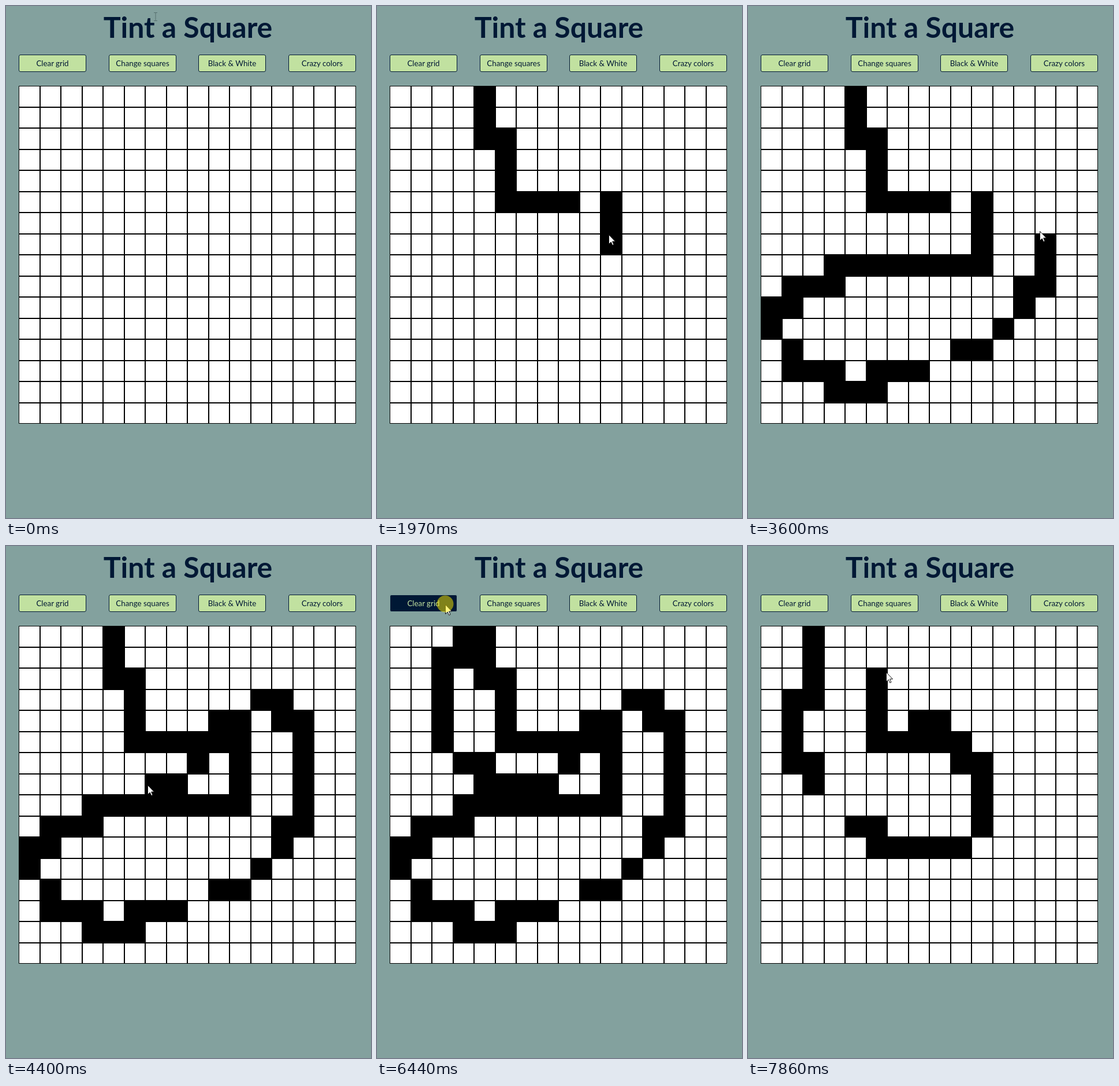
Animation, 632 px wide and 885 px high, one loop 8000 ms. Source, as an HTML page with a canvas:

```html
<!DOCTYPE html>
<html lang="en">
<head>
<meta charset="utf-8">
<title>Tint a Square</title>
<style>
  html, body { margin: 0; width: 100%; height: 100%; overflow: hidden; }
  body { position: relative; background: #83a19e; color: #001835; font-family: Lato, sans-serif; }
  h1 { position: absolute; left: 0; top: 6px; width: 630px; margin: 0; font: 700 50px/60px Lato, sans-serif; text-align: center; }
  button {
    position: absolute; top: 84px; width: 117px; height: 30px; box-sizing: border-box; padding: 0;
    border: 1px solid #001835; border-radius: 3px; background: #c1e1a0; color: inherit;
    font: 400 13.333px Lato, sans-serif;
  }
  button.hover { background: #001835; color: #c1e1a0; border-color: #83a19e; }
  canvas { position: absolute; left: 0; top: 0; pointer-events: none; }
</style>
</head>
<body>
<h1>Tint a Square</h1>
<button style="left:22px">Clear grid</button>
<button style="left:178px">Change squares</button>
<button style="left:333px">Black &amp; White</button>
<button style="left:489px">Crazy colors</button>
<canvas width="632" height="885"></canvas>
<script>
const LOOP = 8000, SIZE = 16;
const ctx = document.querySelector('canvas').getContext('2d');
const clearButton = document.querySelector('button');
const arrow = new Path2D('M.5.5V16.5L4.2 13 6.7 18.5 9 17.5 6.6 12H11.5Z');

// Each step: time, pointer x, pointer y, cells inked (column and row as hex digits), mode
const steps = [
  [0, 259, 18, '', 'text'],
  [200, 240, 32, '', 'text'],
  [390, 212, 62],
  [580, 167, 84],
  [770, 161, 108],
  [950, 170, 130],
  [1140, 187, 171, '40'],
  [1360, 195, 230, '41 42'],
  [1560, 222, 300, '52 53 54'],
  [1770, 330, 340, '55 65 75 85'],
  [1970, 401, 395, 'a5 a6 a7'],
  [2170, 365, 440, 'a8 98'],
  [2380, 250, 445, '88 78 68'],
  [2580, 140, 480, '58 48 38 39'],
  [2780, 40, 560, '29 19 1a 0a 0b'],
  [2980, 132, 641, '1c 1d 2d'],
  [3180, 225, 630, '3d 3e 4e 5e 5d'],
  [3400, 405, 590, '6d 7d 9c ac'],
  [3600, 505, 389, 'bb ca c9 d9 d8 d7'],
  [3800, 505, 300, 'd6 d5 d4'],
  [4000, 440, 268, 'c4 c3 b3'],
  [4200, 330, 345, 'a4 94 95 85'],
  [4400, 245, 413, '86 77 67'],
  [4620, 150, 370, '57 47 46 36'],
  [4820, 112, 260, '25 24 23'],
  [5020, 118, 190, '22 21'],
  [5230, 160, 148, '31 30'],
  [5430, 150, 122],
  [5630, 128, 107, '', 'hover'],
  [5840, 120, 102, '', 'hover'],
  [6040, 118, 101, '', 'hover'],
  [6440, 118, 101, '', 'press'],
  [6640, 118, 101, '', 'clear'],
  [6840, 85, 275, '20 21 22 23 13'],
  [7040, 123, 411, '14 15 16 26 27'],
  [7270, 290, 520, '49 59 5a 6a 7a'],
  [7460, 357, 353, '8a 9a a9 a8 a7 a6 96 95'],
  [7660, 260, 340, '85 84 74 75 65'],
  [7860, 239, 218, '55 54 53 52']
];

const edge = (start, i) => Math.round(start + 36.5 * i);

function drawGrid(inked) {
  ctx.fillStyle = '#000';
  ctx.fillRect(22, 138, 584, 584);
  ctx.fillStyle = '#fff';
  for (let row = 0; row < SIZE; row++) {
    for (let col = 0; col < SIZE; col++) {
      if (inked.has(col.toString(16) + row.toString(16))) continue;
      const x = edge(22, col), y = edge(138, row);
      ctx.fillRect(x + 1, y + 1, edge(22, col + 1) - x - 2, edge(138, row + 1) - y - 2);
    }
  }
}

function drawPointer(x, y, mode) {
  ctx.save();
  ctx.translate(x, y);
  ctx.lineWidth = 1;
  if (mode === 'text') {
    ctx.strokeStyle = '#56706f';
    ctx.stroke(new Path2D('M-3-6.5H3M-3 7.5H3M0-6.5V7.5'));
  } else {
    ctx.fillStyle = '#fff';
    ctx.strokeStyle = '#111';
    ctx.fill(arrow);
    ctx.stroke(arrow);
  }
  if (mode === 'press') {
    ctx.fillStyle = 'rgba(255, 235, 0, .5)';
    ctx.beginPath();
    ctx.arc(0, -1, 14.5, 0, 2 * Math.PI);
    ctx.fill();
  }
  ctx.restore();
}

function render(time) {
  const inked = new Set();
  let current;
  for (const step of steps) {
    if (step[0] > time) break;
    current = step;
    const [, , , cells = '', mode] = step;
    if (mode === 'clear') inked.clear();
    cells.split(' ').forEach(cell => inked.add(cell));
  }
  const [, x, y, , mode] = current;
  clearButton.classList.toggle('hover', ['hover', 'press', 'clear'].includes(mode));
  ctx.clearRect(0, 0, 632, 885);
  drawGrid(inked);
  drawPointer(x, y, mode);
}

const began = performance.now();
function tick() {
  render((performance.now() - began) % LOOP);
  requestAnimationFrame(tick);
}
tick();
</script>
</body>
</html>
```
